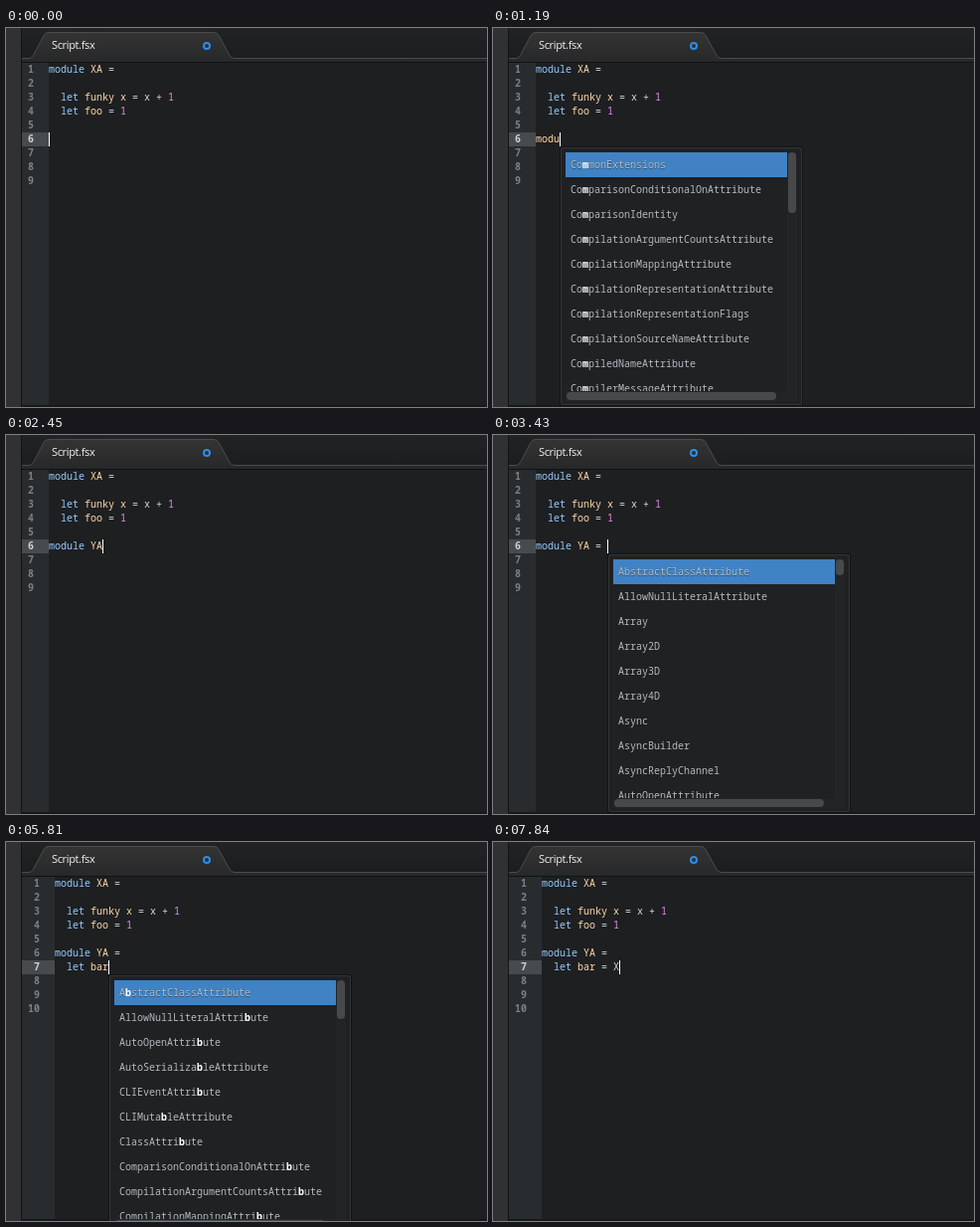
Recreate the animation shown at these times as an HTML page with a canvas. Size 484x381 px, loop 8000 ms.

```html
<!DOCTYPE html>
<html lang="en">
<head>
<meta charset="utf-8">
<title>Editor</title>
<style>
html, body { margin: 0; width: 100%; height: 100%; overflow: hidden; background: #1d1f21; }
canvas { display: block; }
</style>
</head>
<body>
<canvas id="stage" width="484" height="381"></canvas>
<script>
const ctx = document.getElementById('stage').getContext('2d');
const W = 484, H = 381, LOOP = 8000;
const CHAR = 6, ROW = 14, TOP = 35, ITEM = 25;
const MONO = '10px "Noto Sans Mono", monospace';
const COLOR = { keyword: '#96cbfe', name: '#ffd9a8', number: '#e98df0', plain: '#d3d8da' };

const CODE = ['module XA =', '', '  let funky x = x + 1', '  let foo = 1', ''];
const LISTS = {
  m: {
    thumb: 61,
    items: ['CommonExtensions', 'ComparisonConditionalOnAttribute', 'ComparisonIdentity',
      'CompilationArgumentCountsAttribute', 'CompilationMappingAttribute',
      'CompilationRepresentationAttribute', 'CompilationRepresentationFlags',
      'CompilationSourceNameAttribute', 'CompiledNameAttribute', 'CompilerMessageAttribute']
  },
  all: {
    thumb: 16,
    items: ['AbstractClassAttribute', 'AllowNullLiteralAttribute', 'Array', 'Array2D', 'Array3D',
      'Array4D', 'Async', 'AsyncBuilder', 'AsyncReplyChannel', 'AutoOpenAttribute']
  },
  b: {
    thumb: 39,
    items: ['AbstractClassAttribute', 'AllowNullLiteralAttribute', 'AutoOpenAttribute',
      'AutoSerializableAttribute', 'CLIEventAttribute', 'CLIMutableAttribute', 'ClassAttribute',
      'ComparisonConditionalOnAttribute', 'CompilationArgumentCountsAttribute',
      'CompilationMappingAttribute']
  }
};

// [start ms, text of the edited line, caret visible, open list]
const FIRST = [
  [0, '', 1], [280, '', 0], [630, '', 1], [700, 'm', 1], [840, 'm', 1, 'm'],
  [980, 'mo', 1, 'm'], [1050, 'mod', 1, 'm'], [1190, 'modu', 1, 'm'],
  [1400, 'modul', 1, 'm'], [1540, 'module', 1, 'm'], [1680, 'module ', 1, 'm'],
  [1820, 'module ', 1], [2100, 'module Y', 1], [2450, 'module YA', 1],
  [2870, 'module YA', 0], [2940, 'module YA ', 1], [3220, 'module YA =', 1],
  [3430, 'module YA = ', 1, 'all'], [3500, 'module YA = ', 1]
];
const SECOND = [
  [3780, '', 1], [4130, '  ', 1], [4550, '  l', 1], [4620, '  le', 1], [4760, '  let', 1],
  [4970, '  let ', 1], [5390, '  let ', 0], [5460, '  let b', 1], [5600, '  let b', 1, 'b'],
  [5740, '  let ba', 1, 'b'], [5810, '  let bar', 1, 'b'], [6300, '  let bar ', 1, 'b'],
  [6440, '  let bar ', 1], [6580, '  let bar ', 0], [6930, '  let bar ', 1],
  [7280, '  let bar ', 0], [7350, '  let bar =', 1], [7420, '  let bar = ', 1],
  [7840, '  let bar = X', 1]
];
const NEW_LINE = SECOND[0][0];

function rect(x, y, w, h, fill) {
  ctx.fillStyle = fill;
  ctx.fillRect(x, y, w, h);
}

function pill(x, y, w, h, r, fill) {
  ctx.beginPath();
  ctx.roundRect(x, y, w, h, r);
  ctx.fillStyle = fill;
  ctx.fill();
}

function text(str, x, y, fill, font = MONO) {
  ctx.font = font;
  ctx.fillStyle = fill;
  ctx.fillText(str, x, y);
}

function fade(y0, y1, from, to) {
  const g = ctx.createLinearGradient(0, y0, 0, y1);
  g.addColorStop(0, from);
  g.addColorStop(1, to);
  return g;
}

function tabEdge() {
  ctx.beginPath();
  ctx.moveTo(16, 30.5);
  ctx.lineTo(23, 30.5);
  ctx.quadraticCurveTo(26, 30.5, 27.5, 27.5);
  ctx.lineTo(38, 7.5);
  ctx.quadraticCurveTo(39.5, 4.5, 43, 4.5);
  ctx.lineTo(209, 4.5);
  ctx.quadraticCurveTo(212.5, 4.5, 214, 7.5);
  ctx.lineTo(225, 27.5);
  ctx.quadraticCurveTo(226.5, 30.5, 230, 30.5);
  ctx.lineTo(W, 30.5);
}

function drawTabs() {
  rect(16, 0, W - 16, 35, fade(0, 30, '#222324', '#1c1d1e'));
  tabEdge();
  ctx.lineTo(W, 34);
  ctx.lineTo(16, 34);
  ctx.fillStyle = fade(4, 34, '#343434', '#272829');
  ctx.fill();
  tabEdge();
  ctx.strokeStyle = '#4b4c4d';
  ctx.lineWidth = 1;
  ctx.stroke();
  rect(16, 34, W - 16, 1, '#111213');

  ctx.letterSpacing = '-0.35px';
  text('Script.fsx', 46, 21, '#f2f2f2', '11px "Open Sans", sans-serif');
  ctx.letterSpacing = '0px';

  ctx.beginPath();
  ctx.arc(202, 18, 3, 0, Math.PI * 2);
  ctx.strokeStyle = '#2b8eea';
  ctx.lineWidth = 2;
  ctx.stroke();
}

function drawCode(line, x, y) {
  for (const m of line.matchAll(/\w+|[=+]/g)) {
    const word = m[0];
    const value = line.lastIndexOf('=', m.index) >= 0;
    let kind = 'name';
    if (word === 'let' || /^module \w/.test(line) && word === 'module') kind = 'keyword';
    else if (/^\d/.test(word)) kind = 'number';
    else if (value || /[=+]/.test(word)) kind = 'plain';
    text(word, x + m.index * CHAR, y, COLOR[kind]);
  }
}

function drawGutter(left, count, active) {
  rect(16, TOP, left - 16, H - TOP, '#292c2f');
  rect(16, TOP + active * ROW, left - 16, ROW, '#484b4d');
  ctx.textAlign = 'right';
  for (let i = 0; i < count; i++) {
    text(i + 1, left - 15, TOP + i * ROW + 10, i === active ? '#c8d2d6' : '#7c8083', 'bold ' + MONO);
  }
  ctx.textAlign = 'left';
}

function drawList(key, x, y) {
  const { items, thumb } = LISTS[key];
  pill(x, y, 245, 261, 3, '#121314');
  pill(x + 1, y + 1, 243, 259, 2, '#333537');
  pill(x + 2, y + 2, 241, 257, 2, '#1f2123');

  ctx.save();
  ctx.beginPath();
  ctx.rect(x + 6, y + 6, 223, 240);
  ctx.clip();
  rect(x + 6, y + 6, 223, ITEM, '#4082c4');
  items.forEach((item, i) => {
    const tx = x + 11, ty = y + 22 + i * ITEM;
    const hit = key === 'all' ? -1 : item.indexOf(key);
    const shown = hit < 0 ? item : item.slice(0, hit) + ' ' + item.slice(hit + 1);
    if (i === 0) text(shown, tx, ty + 1, 'rgba(20, 30, 40, 0.5)');
    text(shown, tx, ty, i === 0 ? '#b4b9b8' : '#b3bac0');
    if (hit >= 0) text(key, tx + hit * CHAR, ty, '#ffffff', 'bold ' + MONO);
  });
  ctx.restore();

  rect(x + 229, y + 6, 10, 240, '#222426');
  pill(x + 230, y + 6, 8, thumb, 4, '#48494a');
  rect(x + 6, y + 246, 233, 10, '#222426');
  pill(x + 7, y + 247, 211, 8, 4, '#48494a');
}

function draw(t) {
  const second = t >= NEW_LINE;
  const [, typed, caret, list] = (second ? SECOND : FIRST).findLast(s => s[0] <= t);
  const lines = [...CODE, ...(second ? ['module YA ='] : []), typed];
  const active = lines.length - 1;
  const left = second ? 49 : 43;
  const y = TOP + active * ROW;
  const x = left + typed.length * CHAR;

  rect(0, 0, W, H, '#1d1f21');
  rect(0, 0, 15, H, '#303132');
  rect(15, 0, 1, H, '#121314');
  drawTabs();
  drawGutter(left, second ? 10 : 9, active);
  lines.forEach((line, i) => drawCode(line, left, TOP + i * ROW + 10));
  rect(16, 379, W - 16, 2, '#18181b');
  if (caret) rect(x, y, 1, ROW, '#ffffff');
  if (list) drawList(list, x, y + ROW);
}

const start = performance.now();
function tick() {
  draw((performance.now() - start) % LOOP);
  requestAnimationFrame(tick);
}
tick();
</script>
</body>
</html>
```
